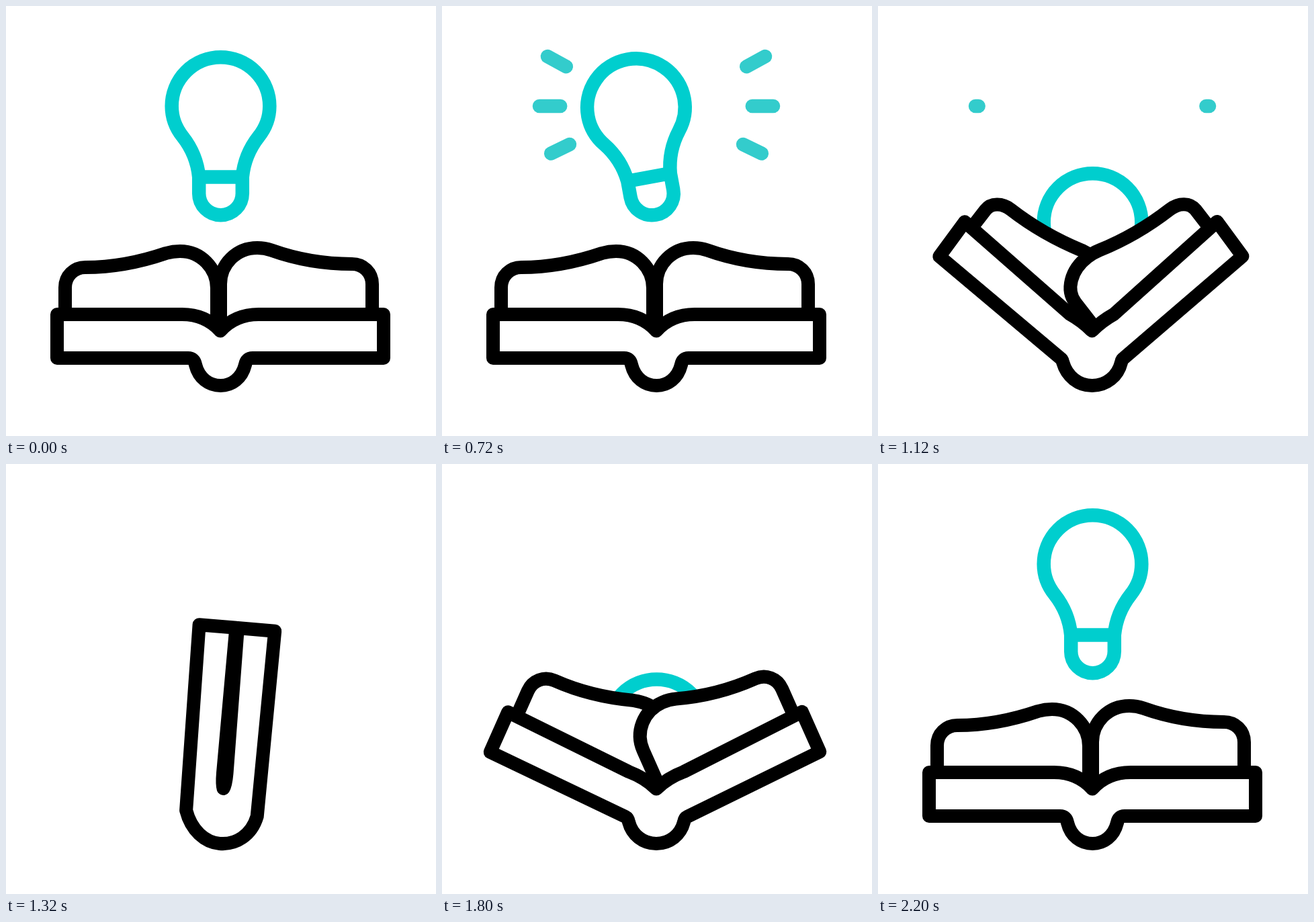
Write an HTML page with a canvas that moves like this. It is 640 px wide and 640 px high and loops after 2400 ms.

```html
<!DOCTYPE html>
<html lang="en">
<head>
<meta charset="utf-8">
<title>Idea book</title>
<style>
html, body { margin: 0; width: 100%; height: 100%; overflow: hidden; background: #fff; }
canvas { display: block; width: 100vmin; height: 100vmin; }
</style>
</head>
<body>
<canvas id="stage" width="640" height="640"></canvas>
<script>
const ctx = document.getElementById('stage').getContext('2d');
const LOOP = 2400, STEP = 40, LAST = 2200;
const TEAL = '#00cece', RAY = '#33cccc', INK = '#000', PAPER = '#fff';
const AXIS = 319, HINGE = [319, 484];
const MID = 24, SHUT = 90;

const lerp = (a, b, p) => a + (b - a) * p;
const mix = (a, b, p) => a.map((v, i) => lerp(v, b[i], p));
const ramp = (t, from, to) => Math.min(1, Math.max(0, (t - from) / (to - from)));
const ease = (t, from, to) => { const p = ramp(t, from, to); return p * p * (3 - 2 * p); };
const flip = ([x, y]) => [2 * AXIS - x, y];

// Rest, one way, the other way, rest: three eased legs of equal length.
function swing(t, start, leg, size) {
  const at = n => ease(t, start + n * leg, start + (n + 1) * leg);
  return size * (at(0) - 2 * at(1) + at(2));
}

// Blend of the open, half-folded and shut values for a fold angle.
const pose = (fold, open, mid, shut) => fold < MID
  ? mix(open, mid, fold / MID)
  : mix(mid, shut, (fold - MID) / (SHUT - MID));

// Rows of 2, 4 and 6 numbers are lines, quadratic and cubic curves.
function trace(rows) {
  const draw = { 2: 'lineTo', 4: 'quadraticCurveTo', 6: 'bezierCurveTo' };
  ctx.beginPath();
  rows.forEach((row, i) => ctx[i ? draw[row.length] : 'moveTo'](...row));
}

function pen(color, width) {
  ctx.strokeStyle = color;
  ctx.lineWidth = width;
  ctx.lineCap = ctx.lineJoin = 'round';
}

function drawBulb(t) {
  const tilt = swing(t, 0, 285, 22.6);
  const drop = 250 * (ease(t, 918, 1238) - ease(t, 1760, 2200));
  ctx.save();
  ctx.translate(319.5 + 0.68 * tilt, 279 + drop);
  ctx.rotate(tilt * Math.PI / 180);
  ctx.translate(-319.5, -279);
  pen(TEAL, 20.5);
  ctx.lineCap = 'butt';
  ctx.beginPath();
  ctx.moveTo(351.8, 254.5);
  ctx.lineTo(351.8, 279);
  ctx.arc(319.5, 279, 32.3, 0, Math.PI);
  ctx.lineTo(287.2, 254.5);
  ctx.bezierCurveTo(285, 232, 276, 211, 263, 194.5);
  ctx.bezierCurveTo(253, 182, 246.7, 166, 246.7, 149);
  ctx.arc(319.5, 149, 72.8, Math.PI, 0);
  ctx.bezierCurveTo(392.3, 166, 386, 182, 376, 194.5);
  ctx.bezierCurveTo(363, 211, 354, 232, 351.8, 254.5);
  ctx.closePath();
  ctx.moveTo(287, 254.5);
  ctx.lineTo(352, 254.5);
  ctx.stroke();
  ctx.restore();
}

// Draws a share of a ray, measured from its fixed end, on both sides.
function drawRay(fixed, free, share, color) {
  if (share <= 0) return;
  pen(color, 20.5);
  const tip = mix(fixed, free, share);
  trace([fixed, tip]);
  ctx.stroke();
  trace([flip(fixed), flip(tip)]);
  ctx.stroke();
}

function drawRays(t) {
  const share = (from, to) => ease(t, 600, 760) - ramp(t, from, to);
  if (t < 600 || t > 1150) return;
  if (t >= 760) drawRay([190, 206], [157, 222], share(980, 1120), INK);
  drawRay([157, 75], [190, 93], share(900, 1050), RAY);
  drawRay([145, 149], [182, 149], share(910, 1150), RAY);
  drawRay([190, 206], [157, 222], share(900, 1020), RAY);
}

// Left half turns clockwise (side 1), right half the other way (side -1).
function turn(x, y, side, fold, shift) {
  const a = side * fold * Math.PI / 180;
  const dx = x - HINGE[0], dy = y - HINGE[1];
  return [
    HINGE[0] + dx * Math.cos(a) - dy * Math.sin(a) + shift[0],
    HINGE[1] + dx * Math.sin(a) + dy * Math.cos(a) + shift[1]
  ];
}

// Drift of each part at half fold (leaf, mid) and when shut (top, low).
const HALVES = [
  {
    side: 1, leaf: [-6.5, 7], mid: [-9, 7], top: [-29, 2], low: [-19, 2],
    page: [[88, 459], [88, 419], [88, 402, 101, 389, 118, 389],
      [162, 389, 203, 380, 238, 368], [245, 366, 252, 365, 259, 365],
      [290, 365, 314, 390, 314, 420], [314, 478]]
  },
  {
    side: -1, leaf: [9, 6.5], mid: [5, 6.5], top: [23.5, 2], low: [14, 2],
    page: [[545, 459], [545, 414], [545, 397, 532, 384, 515, 384],
      [471, 384, 430, 376, 395, 363.5], [388, 361, 381, 360, 374, 360],
      [343, 360, 319, 384, 319, 414], [319, 478]]
  }
];

function drawPage(half, fold) {
  const shift = pose(fold, [0, 0], half.leaf, half.top);
  const [height] = pose(fold, [1], [1], [0]);
  const move = row => {
    const out = [];
    for (let i = 0; i < row.length; i += 2) {
      out.push(...turn(row[i], 459 + (row[i + 1] - 459) * height, half.side, fold, shift));
    }
    return out;
  };
  trace(half.page.map(move));
  ctx.fill();
  ctx.stroke();
}

function coverHalf(half, fold) {
  const left = half.side > 0;
  const own = p => left ? p : flip(p);
  const at = (a, b, c) => own(pose(fold, a, b, c));
  const shift = end => pose(fold, [0, 0], half.mid, end);
  const edge = left ? 76 : 562;
  const rim = left ? 314 : 318.5;
  const base = left ? [264, 520] : [268, 520];
  return {
    inner: at([262, 459], [278, 458], [rim, 460]),
    bend: at([297, 459], [302, 467], [rim, 477]),
    top: turn(edge, 459, half.side, fold, shift(half.top)),
    low: turn(edge, 524, half.side, fold, shift(half.low)),
    foot: at([271, 524], [273, 525], base),
    knee: at([280, 524], [277, 527], base),
    hip: at([282, 534], [278, 533], base),
    sag: at([287, 554], [283, 552], [274, 549]),
    keel: at([302, 565], [299, 565], [296, 565])
  };
}

function drawCover(fold) {
  const [l, r] = HALVES.map(h => coverHalf(h, fold));
  const dip = pose(fold, [319, 483.5], [319, 483.5], [316.5, 483]);
  const bottom = pose(fold, [319.5, 565], [319, 565], [318, 565]);
  trace([
    dip,
    [...l.bend, ...l.inner],
    l.top, l.low, l.foot,
    [...l.knee, ...l.hip],
    [...l.sag, ...l.keel, ...bottom],
    [...r.keel, ...r.sag, ...r.hip],
    [...r.knee, ...r.foot],
    r.low, r.top, r.inner,
    [...r.bend, ...dip]
  ]);
  ctx.closePath();
  ctx.fill();
  ctx.stroke();
}

function drawBook(t, fold) {
  ctx.save();
  ctx.translate(AXIS, 566);
  ctx.rotate(swing(t, 1240, 400 / 3, 7.5) * Math.PI / 180);
  ctx.translate(-AXIS, -566);
  pen(INK, 20);
  ctx.fillStyle = PAPER;
  HALVES.forEach(h => drawPage(h, fold));
  drawCover(fold);
  ctx.restore();
}

function draw(t) {
  const fold = SHUT * (ease(t, 1012, 1254) - ease(t, 1640, 1882));
  ctx.fillStyle = PAPER;
  ctx.fillRect(0, 0, 640, 640);
  drawRays(t);
  if (fold < 72) drawBulb(t);
  drawBook(t, fold);
}

const begin = performance.now();
function tick() {
  const t = (performance.now() - begin) % LOOP;
  draw(Math.min(LAST, Math.floor(t / STEP) * STEP));
  requestAnimationFrame(tick);
}
tick();
</script>
</body>
</html>
```
